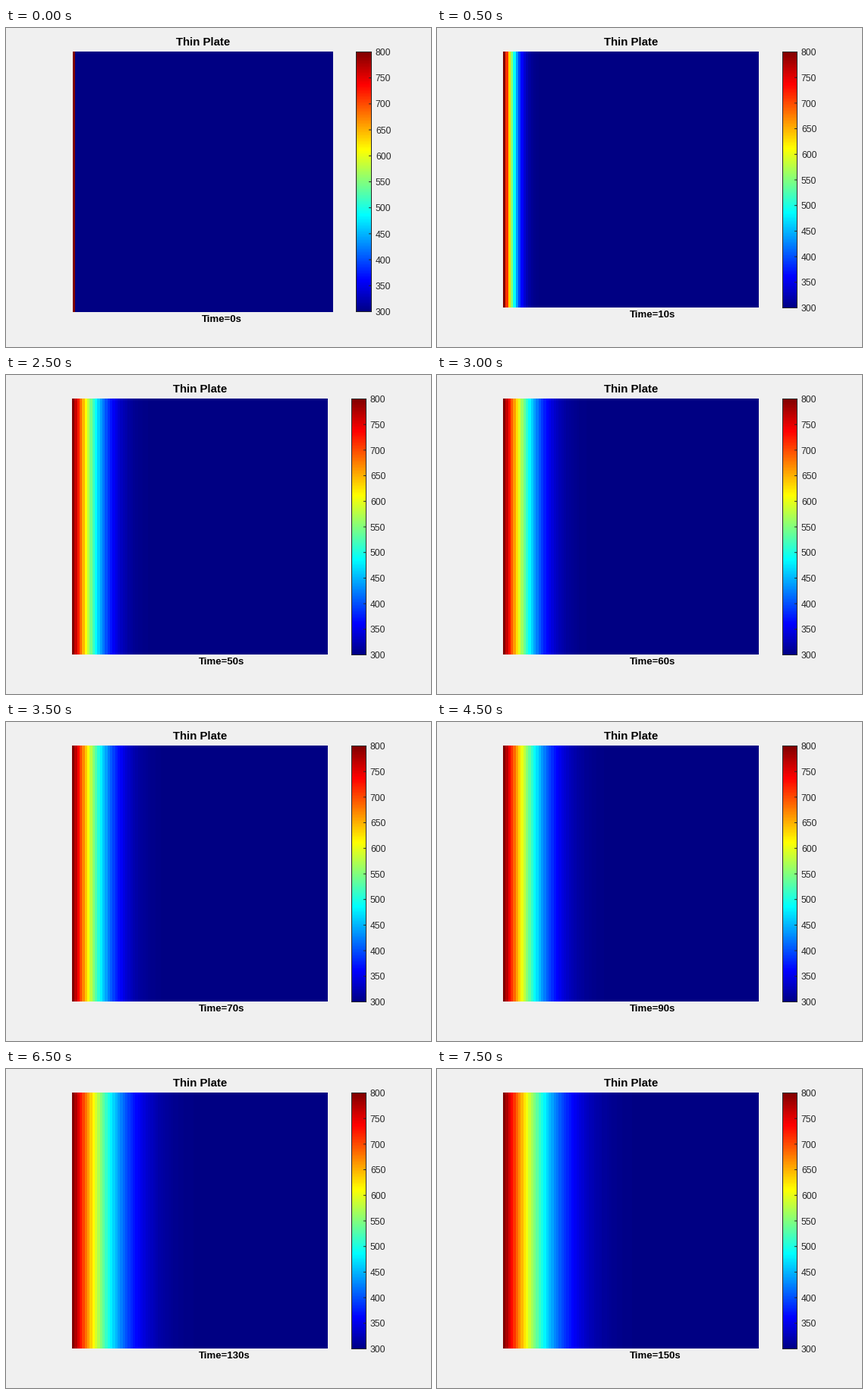
Recreate the animation shown at these times as a matplotlib script. Size 560 by 420 pixels, loop 8000 ms.

```python
import math

import matplotlib.pyplot as plt
import numpy as np
from matplotlib.animation import FuncAnimation
from matplotlib.colors import ListedColormap
from matplotlib.patches import Rectangle

W, H, DPI = 560, 420, 100
FRAMES, INTERVAL = 16, 500
STEP = 10                      # simulated seconds per frame
COLD, HOT = 300, 800
CELLS = 101
DIFFUSIVITY = 1.04             # cells^2 per second
TICKS = range(COLD, HOT + 1, 50)
INK = "#262626"

# Layouts: plate (left, top, size), bar (left, right, top, bottom), baseline of the clock
FIRST = ((88.4, 31, 343), (461, 482, 31, 374), 387)
REST = ((87.4, 31, 337), (455, 475, 31, 369), 381)


def px(size):
    return size * 72 / DPI


def jet():
    i = np.arange(1, 257)

    def ramp(lo, hi):
        return np.clip(np.minimum(i - lo, hi - i) / 64, 0, 1)

    return ListedColormap(np.column_stack([ramp(96, 288), ramp(32, 224), ramp(-32, 160)]))


def temperature(t):
    spread = 2 * math.sqrt(DIFFUSIVITY * max(t, 1e-9))
    return np.array([[COLD + (HOT - COLD) * math.erfc(k / spread) for k in range(CELLS)]])


plt.rcParams["font.family"] = "Liberation Sans"
fig = plt.figure(figsize=(W / DPI, H / DPI), dpi=DPI, facecolor="#f0f0f0")
ax = fig.add_axes([0, 0, 1, 1])
ax.axis("off")

style = dict(cmap=jet(), vmin=COLD, vmax=HOT, interpolation="nearest", aspect="auto")
line = dict(lw=px(1), snap=False)
plate = ax.imshow(temperature(0), **style)
bar = ax.imshow(np.linspace(HOT, COLD, 256)[:, None], **style)
frame = ax.add_patch(Rectangle((0, 0), 1, 1, fill=False, ec=INK, **line))
marks = [ax.plot([], [], color=INK, solid_capstyle="butt", **line)[0] for _ in TICKS]
labels = [ax.text(0, 0, str(v), size=px(12.1), color=INK) for v in TICKS]
title = ax.text(0, 23, "Thin Plate", size=px(15), weight="bold", ha="center")
clock = ax.text(0, 0, "", size=px(13.2), weight="bold")


def arrange(layout):
    (left, top, size), (x0, x1, y0, y1), base = layout
    plate.set_extent((left, left + size, top + size, top))
    bar.set_extent((x0, x1, y1, y0))
    frame.set_bounds(x0 + 0.5, y0 + 0.5, x1 - x0 - 1, y1 - y0 - 1)
    for v, mark, label in zip(TICKS, marks, labels):
        y = y1 - 0.5 - (y1 - y0 - 1) * (v - COLD) / (HOT - COLD)
        mark.set_data([x1 - 4, x1 - 1], [y, y])
        label.set_position((x1 + 4.9, y + 4.6))
    title.set_x(left + size / 2)
    clock.set_position((left + 0.493 * size, base))
    ax.set_xlim(0, W)
    ax.set_ylim(H, 0)


def draw(i):
    arrange(REST if i else FIRST)
    plate.set_data(temperature(i * STEP))
    clock.set_text(f"Time={i * STEP}s")
    return [plate, bar, frame, title, clock, *marks, *labels]


anim = FuncAnimation(fig, draw, frames=FRAMES, interval=INTERVAL, repeat=True, repeat_delay=0)
plt.show()
```
